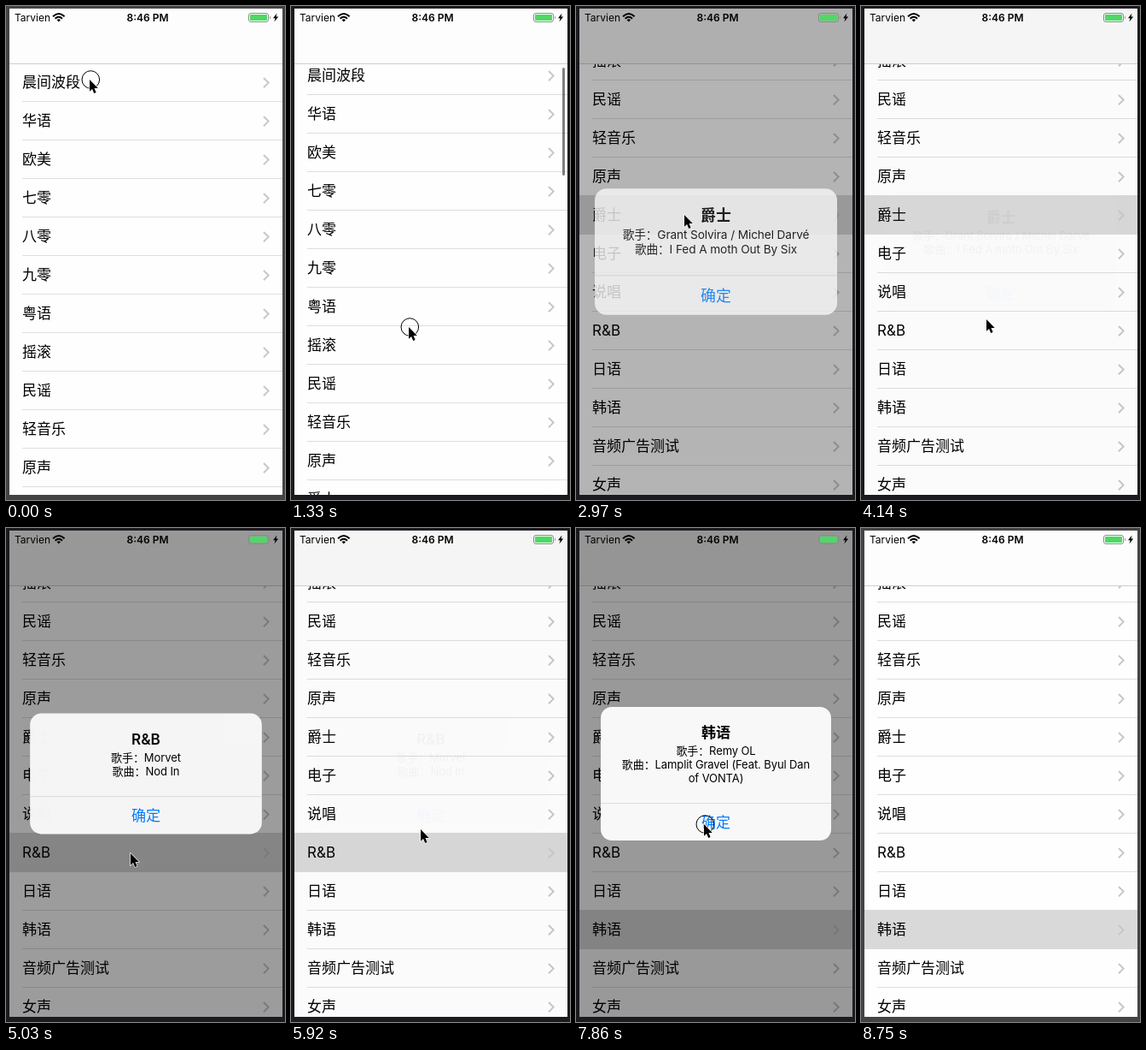
Write an HTML page that moves like this. It is 327x577 px and loops after 8850 ms.

```html
<!DOCTYPE html>
<html lang="zh-CN">
<head>
<meta charset="utf-8">
<title>Radio list</title>
<style>
html, body { margin: 0; width: 100%; height: 100%; overflow: hidden; background: #1c1a1e; }
svg { display: block; font: 17px Inter, "Noto Sans CJK SC", "Noto Sans CJK", sans-serif; }
.mid { text-anchor: middle; }
.small { font-size: 12px; }
.bold { font-weight: 600; }
.msg { font-size: 13px; letter-spacing: -.1px; }
</style>
</head>
<body>
<svg width="327" height="577" viewBox="0 0 327 577">
  <clipPath id="screen"><rect x="4" y="3" width="320" height="568"/></clipPath>
  <rect id="frame" width="327" height="577"/>
  <g clip-path="url(#screen)">
    <rect x="4" y="3" width="320" height="568" fill="#fefefe"/>
    <g id="list"></g>
    <rect id="bar" x="318" width="3" height="126" rx="1.5" fill="#000" fill-opacity=".5"/>
    <rect id="nav" x="4" y="3" width="320" height="64"/>
    <rect x="4" y="67" width="320" height="1" fill="#cfcfd1"/>
    <rect id="dim" x="4" y="3" width="320" height="568"/>
    <g id="status">
      <text class="small" x="10" y="17.5">Tarvien</text>
      <g fill="none" stroke="#000" stroke-width="2">
        <path d="M55 12.2Q61.8 5.8 68.6 12.2M57.6 14.8Q61.8 10.8 66 14.8"/>
      </g>
      <path d="M59.6 16.2Q61.8 14.2 64 16.2L61.8 18.6Z"/>
      <text class="small bold mid" x="166" y="17.5">8:46 PM</text>
      <rect x="284.5" y="8.5" width="23" height="10" rx="2.5" fill="none" stroke="#8c8c8c"/>
      <rect x="286" y="10" width="20" height="7" rx="1" fill="#4cd964"/>
      <path d="M309 11.5q2 2 0 4z" fill="#8c8c8c"/>
      <path d="M317.5 8.5L313 14.2h2.6L314.4 18.5 319.2 12.6h-2.7z"/>
    </g>
    <g id="alert"></g>
    <g id="cursor">
      <circle id="ring" cx="1.3" cy="0" r="10.3" fill="none" stroke="#000"/>
      <path d="M0 0V13.8L3.1 10.9 5.2 16 7.6 15 5.5 10H9.8Z" stroke="#fff" stroke-width="1.2" paint-order="stroke"/>
    </g>
  </g>
</svg>
<script>
const LOOP = 8850, STEP = 148, ROW = 45, TOP = 67;
const $ = id => document.getElementById(id);
const set = (id, attrs) => {
  for (const name in attrs) $(id).setAttribute(name, attrs[name]);
};

const rows = ('晨间波段 华语 欧美 七零 八零 九零 粤语 摇滚 民谣 轻音乐 ' +
  '原声 爵士 电子 说唱 R&amp;B 日语 韩语 音频广告测试 女声').split(' ');

// Steps at which each alert opens and is confirmed
const alerts = [
  { open: 20, ok: 26, first: .74, title: '爵士',
    lines: ['歌手：Grant Solvira / Michel Darvé', '歌曲：I Fed A moth Out By Six'] },
  { open: 33, ok: 38, first: .74, title: 'R&amp;B',
    lines: ['歌手：Morvet', '歌曲：Nod In'] },
  { open: 45, ok: 53, first: .85, title: '韩语',
    lines: ['歌手：Remy OL', '歌曲：Lamplit Gravel (Feat. Byul Dan', 'of VONTA)'] }
];

const scroll = [8, 70, 138, 218, 280, 316, 334, 340];
const presses = [0, 8, 9, 10, 11, 17, 26, 31, 38, 42, 53];

// Pointer path: step, x, y
const path = [
  [0, 98, 86], [1, 98, 88], [7, 138, 383], [8, 138, 383], [9, 138, 375],
  [10, 136, 313], [11, 130, 245], [12, 127, 244], [22, 127, 244],
  [25, 148, 342], [26, 148, 342], [28, 147, 366], [30, 146, 380],
  [34, 146, 380], [35, 155, 340], [36, 155, 342], [38, 155, 342],
  [40, 152, 352], [42, 125, 474], [47, 125, 474], [49, 150, 346], [60, 150, 346]
];

function pointer(k) {
  const i = path.findIndex(p => p[0] > k);
  const [a, x, y] = path[i - 1], [b, u, v] = path[i];
  const f = (k - a) / (b - a);
  return [x + (u - x) * f, y + (v - y) * f];
}

function presence(a, k) {
  if (k < a.open || k > a.ok + 2) return 0;
  if (k > a.ok) return k === a.ok + 1 ? .45 : .03;
  return [a.first, .97][k - a.open] ?? 1;
}

function rowMarkup(name, i) {
  const y = TOP + ROW * i;
  return `<rect x="19" y="${y + 44}" width="305" height="1" fill="#dededf"/>
    <rect id="row${i}" x="4" y="${y - 1}" width="320" height="46" fill="#d9d9d9"/>
    <text x="19" y="${y + 28.3}">${name}</text>
    <path d="M302 ${y + 17}l5.6 5.6-5.6 5.6" fill="none" stroke="#c7c7cc" stroke-width="2"/>`;
}

function alertMarkup({ title, lines }) {
  const h = 108 + 16 * lines.length, y = 287 - h / 2;
  const text = (cls, dy, s, fill = '#000') =>
    `<text class="mid ${cls}" x="164" y="${y + dy}" fill="${fill}">${s}</text>`;
  return `<rect x="29" y="${y}" width="270" height="${h}" rx="13" fill="#f8f8f8"/>
    ${text('bold', 36, title)}
    ${lines.map((s, i) => text('msg', 56 + 16 * i, s)).join('')}
    <rect x="29" y="${y + h - 44}" width="270" height="1" fill="#dcdcde"/>
    ${text('', h - 15, '确定', '#007aff')}`;
}

$('list').innerHTML = rows.map(rowMarkup).join('');
$('alert').innerHTML = alerts.map((a, i) => `<g id="alert${i}">${alertMarkup(a)}</g>`).join('');

function draw(k) {
  const offset = k < 9 ? 0 : scroll[Math.min(k - 9, 7)];
  const selected = k < 17 ? -1 : k < 31 ? 11 : k < 42 ? 14 : 16;
  const ends = k === 0 || k === 59;
  let shade = 0;

  alerts.forEach((a, i) => {
    const p = presence(a, k), scale = k > a.ok ? 1 : 1.2 - .2 * p;
    shade = Math.max(shade, p);
    set('alert' + i, {
      opacity: p < .5 ? p : 1 - .8 * (1 - p),
      visibility: p ? 'visible' : 'hidden',
      transform: `translate(164 287) scale(${scale}) translate(-164 -287)`
    });
  });

  rows.forEach((_, i) => set('row' + i, { visibility: i === selected ? 'visible' : 'hidden' }));
  set('frame', { fill: ends ? '#434244' : '#1c1a1e' });
  set('list', { transform: `translate(0 ${-offset})` });
  set('bar', { y: 70 + offset / 4, opacity: k < 9 || k > 15 ? 0 : k === 15 ? .4 : 1 });
  set('nav', { fill: shade ? '#f8f8f8' : '#fdfdfd' });
  set('dim', { 'fill-opacity': .4 * shade });
  set('cursor', {
    transform: `translate(${pointer(k)})`,
    visibility: k === 59 ? 'hidden' : 'visible'
  });
  set('ring', { opacity: presses.includes(k) ? 1 : 0 });
}

function tick() {
  draw(Math.floor((performance.now() % LOOP + 4) / STEP));
  requestAnimationFrame(tick);
}
tick();
</script>
</body>
</html>
```
